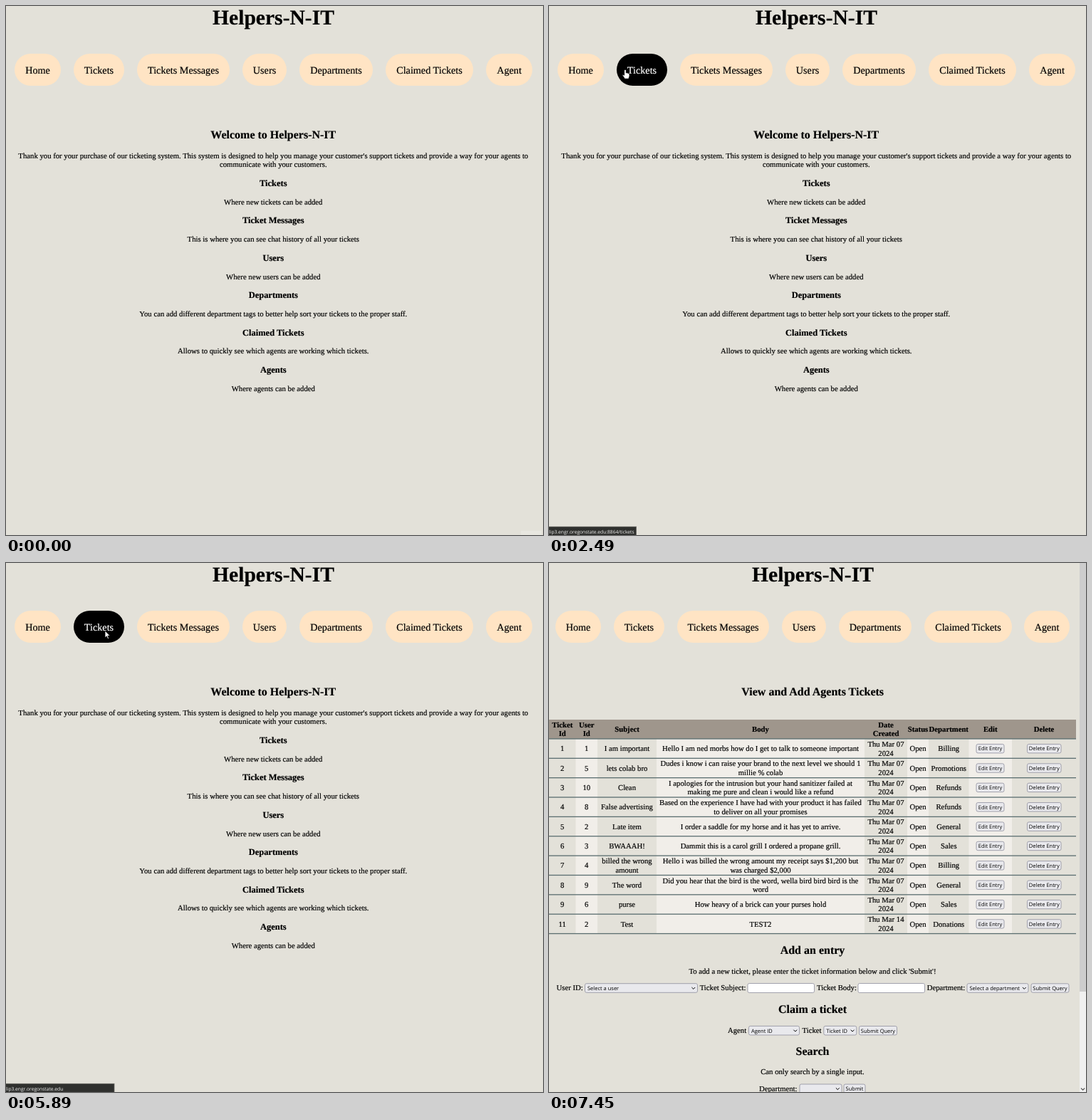
An HTML page that plays this animation: 754 px wide and 743 px high, repeating every 9320 ms.

```html
<!DOCTYPE html>
<html lang="en">
<head>
<meta charset="utf-8">
<title>Ticket desk</title>
<style>
  html, body { margin: 0; width: 100%; height: 100%; overflow: hidden; background: #e3e1d9; }
  svg { display: block; width: 754px; height: 743px; color: #000; }
  text {
    font-family: "Liberation Serif", "Times New Roman", serif;
    text-rendering: geometricPrecision; white-space: pre;
    fill: currentColor; stroke: currentColor; stroke-width: .18px;
  }
  .ui { font-family: "Open Sans", "Noto Sans", sans-serif; stroke: none; }
</style>
</head>
<body>
<svg id="stage" viewBox="0 0 754 743"></svg>
<script>
const LOOP = 9320;
const PAGE_LOAD = 5960;
const BODY = 10.72, H2 = 16, H3 = 12.48;
const BRAND = 'Helpers-N-IT';
const stage = document.getElementById('stage');

function el(parent, tag, attrs, content) {
  const node = document.createElementNS('http://www.w3.org/2000/svg', tag);
  for (const key in attrs) node.setAttribute(key, attrs[key]);
  if (content !== undefined) node.textContent = content;
  parent.appendChild(node);
  return node;
}
const rect = (g, x, y, width, height, fill, more) =>
  el(g, 'rect', { x, y, width, height, fill, ...more });
const label = (g, x, y, size, str, more) =>
  el(g, 'text', { x, y, 'font-size': size, ...more }, str);
const mid = (g, x, y, size, str, more) =>
  label(g, x, y, size, str, { 'text-anchor': 'middle', ...more });
const bold = (g, x, y, size, str) => mid(g, x, y, size, str, { 'font-weight': 700 });
const show = (node, on) => node.setAttribute('visibility', on ? 'visible' : 'hidden');

// Centres one or more lines, split at "|", around y
function cell(g, x, y, str, more) {
  const lines = str.split('|');
  lines.forEach((line, i) =>
    mid(g, x, y + 3.6 + (i - (lines.length - 1) / 2) * 12.6, BODY, line, more));
}

// Navigation
const NAV = ['Home', 'Tickets', 'Tickets Messages', 'Users', 'Departments', 'Claimed Tickets', 'Agent'];
function makeNav(g, starts, ends) {
  return NAV.map((name, i) => {
    const x = starts[i], w = ends[i] - x;
    const pill = rect(g, x, 67, w, 45, '#ffe4c4', { rx: 22.5 });
    const text = mid(g, x + w / 2, 94.7, 14.2, name);
    return { x, w, pill, text };
  });
}
function hover(nav, px, py) {
  let hit = false;
  for (const { x, w, pill, text } of nav) {
    const on = px >= x && px <= x + w && py >= 67 && py <= 112;
    pill.setAttribute('fill', on ? '#000' : '#ffe4c4');
    text.setAttribute('color', on ? '#fff' : '#000');
    hit = hit || on;
  }
  return hit;
}

// Form controls
const control = (g, x, y, w, h, fill) =>
  rect(g, x + .5, y - h / 2, w - 1, h, fill, { rx: 2.2, stroke: '#8f8f9d', 'stroke-width': .8 });
function button(g, x, y, w, str) {
  control(g, x, y, w, 12.4, '#e9e9ed');
  mid(g, x + w / 2, y + 2.8, 7.5, str, { class: 'ui' });
}
function select(g, x, y, w, str) {
  control(g, x, y, w, 12.6, '#e9e9ed');
  label(g, x + 4, y + 2.8, 7.5, str, { class: 'ui' });
  el(g, 'path', { d: `M${x + w - 8.6},${y - 1}l2.4,2.4l2.4,-2.4`, fill: 'none', stroke: '#000', 'stroke-width': 1 });
}

// Welcome page
const home = el(stage, 'g', {});
bold(home, 375.5, 26.2, 29.6, BRAND);
const homeNav = makeNav(home, [12, 95, 184, 332, 412, 533, 674], [77, 166, 314, 394, 515, 656, 739]);
bold(home, 375.3, 186.3, H2, 'Welcome to ' + BRAND);
mid(home, 375.3, 213.6, BODY, "Thank you for your purchase of our ticketing system. This system is designed to help you manage your customer's support tickets and provide a way for your agents to");
mid(home, 375.3, 226.4, BODY, 'communicate with your customers.');
[
  ['Tickets', 'Where new tickets can be added'],
  ['Ticket Messages', 'This is where you can see chat history of all your tickets'],
  ['Users', 'Where new users can be added'],
  ['Departments', 'You can add different department tags to better help sort your tickets to the proper staff.'],
  ['Claimed Tickets', 'Allows to quickly see which agents are working which tickets.'],
  ['Agents', 'Where agents can be added']
].forEach(([head, line], i) => {
  bold(home, 375.3, 252.8 + 52.45 * i, H3, head);
  mid(home, 375.3, 278.6 + 52.45 * i, BODY, line);
});
const corner = rect(home, 723, 737, 29, 6, '#e8e7e0');

// Tickets page
const desk = el(stage, 'g', {});
bold(desk, 370.5, 26.2, 29.6, BRAND);
const deskNav = makeNav(desk, [9, 91, 180, 327, 407, 527, 667], [73, 162, 309, 389, 509, 650, 731]);
bold(desk, 370.2, 186.3, H2, 'View and Add Agents Tickets');

const EDGES = [0, 37.5, 68, 151, 443, 503, 533, 589.5, 650, 740];
const ROW = 27.36, TOP = 247;
const centre = i => (EDGES[i] + EDGES[i + 1]) / 2;
const HEADS = ['Ticket|Id', 'User|Id', 'Subject', 'Body', 'Date|Created', 'Status', 'Department', 'Edit', 'Delete'];
const ROWS = [
  [1, 1, 'I am important', 'Hello I am ned morbs how do I get to talk to someone important', 'Billing'],
  [2, 5, 'lets colab bro', 'Dudes i know i can raise your brand to the next level we should 1|millie % colab', 'Promotions'],
  [3, 10, 'Clean', 'I apologies for the intrusion but your hand sanitizer failed at|making me pure and clean i would like a refund', 'Refunds'],
  [4, 8, 'False advertising', 'Based on the experience I have had with your product it has failed|to deliver on all your promises', 'Refunds'],
  [5, 2, 'Late item', 'I order a saddle for my horse and it has yet to arrive.', 'General'],
  [6, 3, 'BWAAAH!', 'Dammit this is a carol grill I ordered a propane grill.', 'Sales'],
  [7, 4, 'billed the wrong|amount', 'Hello i was billed the wrong amount my receipt says $1,200 but|was charged $2,000', 'Billing'],
  [8, 9, 'The word', 'Did you hear that the bird is the word, wella bird bird bird is the|word', 'General'],
  [9, 6, 'purse', 'How heavy of a brick can your purses hold', 'Sales'],
  [11, 2, 'Test', 'TEST2', 'Donations']
];
for (let i = 1; i < 9; i += 2)
  rect(desk, EDGES[i], TOP, EDGES[i + 1] - EDGES[i], ROW * ROWS.length, '#f1eee9');
rect(desk, 0, 220, 740, TOP - 220, '#9f968c');
HEADS.forEach((head, i) => cell(desk, centre(i), 233.4, head, { 'font-weight': 700 }));
for (let i = 0; i <= ROWS.length; i++)
  rect(desk, 0, TOP + ROW * i - .7, 740, 1.3, '#5b6e70');
ROWS.forEach(([id, user, subject, body, dept], r) => {
  const y = TOP + ROW * (r + .5);
  const date = `Thu Mar ${id === 11 ? '14' : '07'}|2024`;
  ['' + id, '' + user, subject, body, date, 'Open', dept].forEach((str, i) => cell(desk, centre(i), y, str));
  button(desk, 599.5, y, 40, 'Edit Entry');
  button(desk, 671, y, 48.5, 'Delete Entry');
});

bold(desk, 370, 549.3, H2, 'Add an entry');
mid(desk, 370, 576.7, BODY, "To add a new ticket, please enter the ticket information below and click 'Submit'!");
label(desk, 10.5, 600, BODY, 'User ID:');
select(desk, 50, 597, 159, 'Select a user');
label(desk, 211.7, 600, BODY, 'Ticket Subject:');
control(desk, 278.5, 597, 94.5, 13, '#fff');
label(desk, 376, 600, BODY, 'Ticket Body:');
control(desk, 433.5, 597, 94.5, 13, '#fff');
label(desk, 530.7, 600, BODY, 'Department:');
select(desk, 586.5, 597, 87, 'Select a department');
button(desk, 676.5, 597, 54, 'Submit Query');

bold(desk, 370, 632, H2, 'Claim a ticket');
label(desk, 251, 660, BODY, 'Agent');
select(desk, 280, 656.7, 72, 'Agent ID');
label(desk, 355.5, 660, BODY, 'Ticket');
select(desk, 385.3, 656.7, 47, 'Ticket ID');
button(desk, 435, 656.7, 54, 'Submit Query');

bold(desk, 370, 690.8, H2, 'Search');
mid(desk, 370, 718.4, BODY, 'Can only search by a single input.');
label(desk, 295, 741.6, BODY, 'Department:');
select(desk, 351.5, 738.3, 60, '');
button(desk, 413.5, 738.3, 31, 'Submit');

rect(desk, 745, 0, 9, 743, '#f0f0f0');
rect(desk, 745, 0, 9, 602, '#cdcdcd');
el(desk, 'path', { d: 'M747,737.6l2.6,2.6l2.6,-2.6', fill: 'none', stroke: '#505050', 'stroke-width': 1.2 });

// Link bar at the bottom left
const HOST = 'lip3.engr.oregonstate.edu';
const LINKS = [
  [0, '', 0],
  [1930, HOST + ':8864', 100],
  [2350, HOST + ':8864/tickets', 122.5],
  [3620, HOST + ':8864/ticket_chats', 139],
  [5300, '', 0],
  [5630, HOST + ':8864/tickets', 122.5],
  [5820, HOST, 152],
  [PAGE_LOAD, '', 0],
  [6090, HOST + ':8864/tickets', 122.5],
  [6760, '', 0]
];
const bar = el(stage, 'g', {});
const barBox = rect(bar, -2, 731.3, 10, 14, '#2f302e', { stroke: '#686864', 'stroke-width': .8 });
const barText = label(bar, 0, 740.6, 6.68, '', { class: 'ui', color: '#f4f4f4' });

// Pointer
const ink = { fill: '#fff', stroke: '#000', 'stroke-width': .8, 'stroke-linejoin': 'round' };
const arrow = el(stage, 'path', { d: 'M0,0V10L2.3,7.9L3.9,11.6L5.5,10.9L3.9,7.3H7Z', ...ink });
const hand = el(stage, 'path', {
  d: 'M-1.3,1Q0,-.6 1.3,1V5Q2.5,4.2 3,5.2Q4.2,4.6 4.6,5.8Q6,5.4 6,7V9.5L4.8,13.2H-.6L-3.8,8.4Q-3.4,6.8 -1.3,8.2Z', ...ink
});

// Each move: first change, last change, number of steps, end point
const MOVES = [
  [270, 660, 6, 328, 267],
  [1260, 1730, 7, 68, 119],
  [1800, 2140, 6, 45, 96],
  [2210, 2490, 5, 107, 89],
  [3280, 3890, 9, 266, 98],
  [4890, 5160, 5, 228, 158],
  [5300, 5710, 7, 139, 95],
  [6630, 7450, 13, 735, 760]
];
function pointer(t) {
  let x = 765, y = 820;
  for (const [from, to, steps, endX, endY] of MOVES) {
    if (t < from) break;
    const f = Math.min(1, (t - from) / (to - from));
    const p = (Math.floor(f * (steps - 1)) + 1) / steps;
    x += (endX - x) * p;
    y += (endY - y) * p;
  }
  return [x, y];
}

function render(t) {
  const loaded = t >= PAGE_LOAD;
  home.setAttribute('display', loaded ? 'none' : 'inline');
  desk.setAttribute('display', loaded ? 'inline' : 'none');
  show(corner, t < 70);

  const [x, y] = pointer(t);
  const over = hover(loaded ? deskNav : homeNav, x, y);
  const busy = t >= 5820 && !loaded;
  show(hand, over && !busy);
  show(arrow, !over || busy);
  for (const shape of [hand, arrow]) shape.setAttribute('transform', `translate(${x},${y})`);

  const [, link, width] = LINKS.filter(entry => entry[0] <= t).pop();
  show(bar, link !== '');
  barBox.setAttribute('width', width + 2);
  barText.textContent = link;
}

const begin = performance.now();
function tick() {
  render((performance.now() - begin) % LOOP);
  requestAnimationFrame(tick);
}
render(0);
requestAnimationFrame(tick);
</script>
</body>
</html>
```
